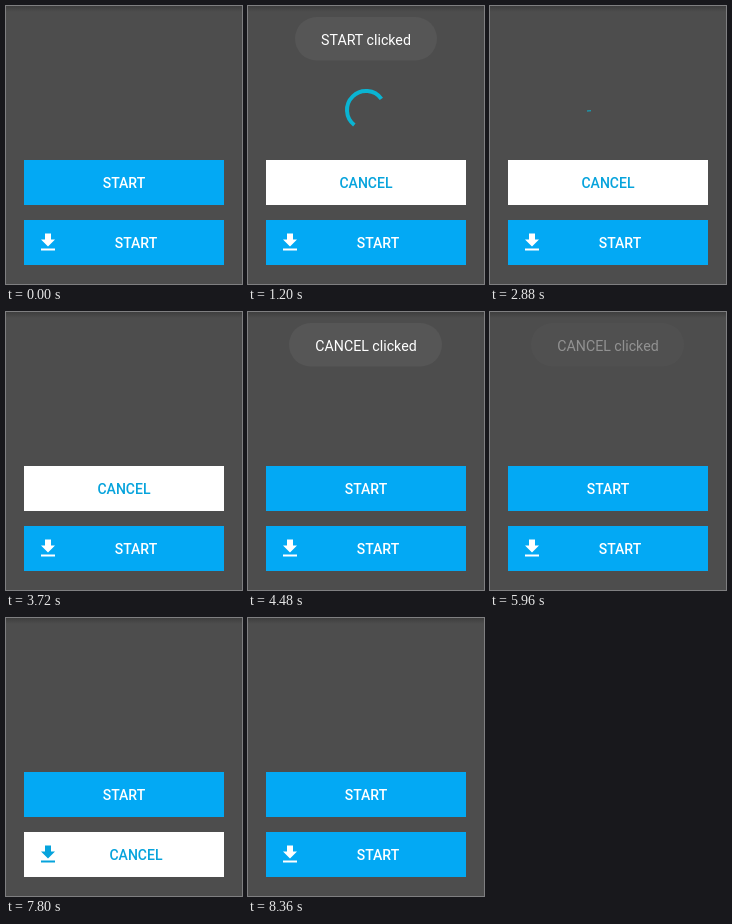
Recreate the animation shown at these times as an HTML page. Size 236x278 px, loop 9.88 s.

```html
<!DOCTYPE html>
<html lang="en">
<head>
<meta charset="utf-8">
<title>Reveal buttons</title>
<style>
  html, body { margin: 0; width: 100%; height: 100%; overflow: hidden; background: #4d4d4d; }
  svg { display: block; }
  text { font-family: Roboto, "Noto Sans", sans-serif; text-anchor: middle; }
  .label { font-size: 14px; font-weight: 500; }
  .toast text { font-size: 14.2px; fill: #fff; }
  .toast rect { fill: #565656; }
</style>
</head>
<body>
<svg id="stage" width="236" height="278" viewBox="0 0 236 278">
  <defs>
    <linearGradient id="shade" x2="0" y2="1">
      <stop offset="0" stop-color="#3e3e3e"/>
      <stop offset="1" stop-color="#4d4d4d"/>
    </linearGradient>
  </defs>
  <rect width="236" height="278" fill="#4d4d4d"/>
  <rect width="236" height="6" fill="url(#shade)"/>
  <path id="spinner" fill="none" stroke="#0ab4d2" stroke-width="4"/>
</svg>
<script>
const LOOP = 9880;
const BLUE = '#03a9f4', DEEP = '#06a3dc', WHITE = '#fff';
const ICON = 'M19 9h-4V3H9v6H5l7 7 7-7zM5 18v2h14v-2z';
const stage = document.getElementById('stage');
const spinner = document.getElementById('spinner');

function add(parent, tag, attrs, text) {
  const el = document.createElementNS('http://www.w3.org/2000/svg', tag);
  for (const k in attrs) el.setAttribute(k, attrs[k]);
  if (text) el.textContent = text;
  return parent.appendChild(el);
}

const clamp = x => Math.min(1, Math.max(0, x));
const span = (t, a, b) => clamp((t - a) / (b - a));
const easeInOut = x => (1 - Math.cos(Math.PI * x)) / 2;

// cubic-bezier(.4, 0, .2, 1), solved by bisection
function fastOutSlowIn(x) {
  let lo = 0, hi = 1, s = .5;
  for (let i = 0; i < 24; i++) {
    s = (lo + hi) / 2;
    const r = 1 - s;
    if (1.2 * r * r * s + .6 * r * s * s + s * s * s < x) lo = s; else hi = s;
  }
  return s * s * (3 - 2 * s);
}

function face(y, textX, icon, label, bg, fg, clip) {
  const g = add(stage, 'g', clip ? { 'clip-path': `url(#${clip})` } : {});
  add(g, 'rect', { x: 18, y, width: 200, height: 45, fill: bg });
  if (icon) add(g, 'path', { d: ICON, fill: fg, transform: `translate(30 ${y + 10.5})` });
  add(g, 'text', { class: 'label', x: textX, y: y + 28, fill: fg }, label);
}

// A start face, with a cancel face and a second start face revealed over it
function makeButton(id, y, textX, icon, cx, cy, times) {
  face(y, textX, icon, 'START', BLUE, WHITE);
  return times.map(([from, to], i) => {
    const clip = add(stage, 'clipPath', { id: id + i });
    const circle = add(clip, 'circle', { cx, cy, r: 0 });
    if (i) face(y, textX, icon, 'START', BLUE, WHITE, id + i);
    else face(y, textX, icon, 'CANCEL', WHITE, DEEP, id + i);
    const full = Math.hypot(Math.max(cx - 18, 218 - cx), Math.max(cy - y, y + 45 - cy)) + 1;
    return t => circle.setAttribute('r', full * easeInOut(span(t, from, to)));
  });
}

function makeToast(label, x, width, [in0, in1, out0, out1]) {
  const g = add(stage, 'g', { class: 'toast' });
  add(g, 'rect', { x, y: 11, width, height: 43.5, rx: 21.7 });
  add(g, 'text', { x: 118, y: 39 }, label);
  return t => g.setAttribute('opacity', span(t, in0, in1) - span(t, out0, out1));
}

function spin(t) {
  const on = t >= 385 && t < 3720;
  spinner.setAttribute('visibility', on ? 'visible' : 'hidden');
  if (!on) return;
  const cycles = (t - 385) / 1290, n = Math.floor(cycles), u = cycles - n;
  const turn = 234 * cycles + 270 * n - 4;
  const a = turn + 270 * fastOutSlowIn(clamp(2 * u - 1));
  const b = Math.max(a + 2, turn + 270 * fastOutSlowIn(clamp(2 * u)));
  const at = deg => {
    const r = deg * Math.PI / 180;
    return `${118 + 19 * Math.sin(r)} ${104 - 19 * Math.cos(r)}`;
  };
  spinner.setAttribute('d', `M${at(a)}A19 19 0 ${b - a > 180 ? 1 : 0} 1 ${at(b)}`);
}

const parts = [
  spin,
  ...makeButton('top', 154, 118, false, 180, 180, [[320, 880], [3820, 4280]]),
  ...makeButton('low', 214, 130, true, 180, 253, [[6120, 6700], [7790, 8360]]),
  makeToast('START clicked', 47, 142, [400, 760, 2400, 2800]),
  makeToast('CANCEL clicked', 41, 153, [3900, 4260, 5740, 6100])
];

const start = performance.now();
function draw(now) {
  const t = Math.max(0, now - start) % LOOP;
  parts.forEach(part => part(t));
  requestAnimationFrame(draw);
}
draw(start);
</script>
</body>
</html>
```
